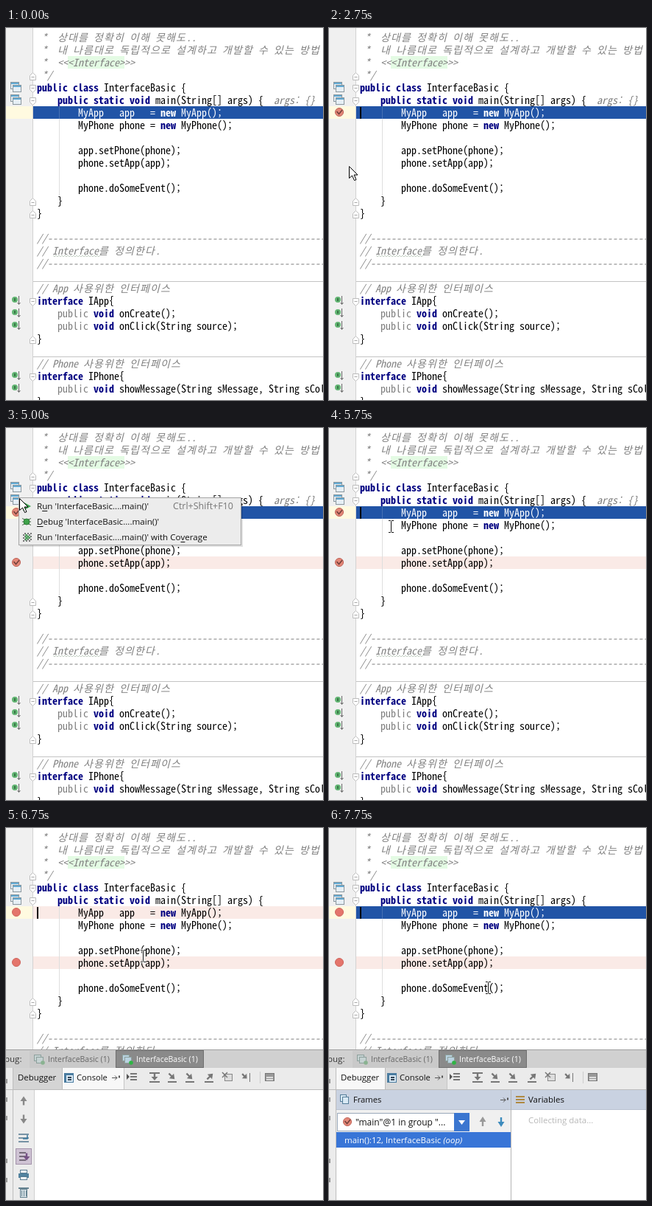
These frames come from a looping animation (431 px wide and 504 px high, 8000 ms). An HTML page with a canvas:

```html
<!DOCTYPE html>
<html lang="ko">
<head>
<meta charset="utf-8">
<style>
  html, body { margin: 0; width: 100%; height: 100%; overflow: hidden; background: #fff; }
  canvas { display: block; }
</style>
</head>
<body>
<canvas id="stage" width="431" height="504"></canvas>
<script>
const ctx = document.getElementById('stage').getContext('2d');
const LOOP = 8000, STEP = 250, ROW = 17, LEFT = 42, COLUMN = 7;
const MONO = '"Noto Sans Mono CJK KR", "Noto Sans Mono", "Noto Sans CJK KR", monospace';
const UI = '"Open Sans", "Noto Sans", sans-serif';
const BLUE = '#2154a6', PINK = '#faeae6', NAVY = '#000080', GRAY = '#808080';

ctx.font = `14px ${MONO}`;
const codeSize = 14 * COLUMN / ctx.measureText('a').width;

const rule = '//' + '-'.repeat(70);
const code = [
  ' *  상대를 정확히 이해 못해도..',
  ' *  내 나름대로 독립적으로 설계하고 개발할 수 있는 방법',
  ' *  <<<Interface>>>',
  ' */',
  'public class InterfaceBasic {',
  '    public static void main(String[] args) {',
  '        MyApp   app   = new MyApp();',
  '        MyPhone phone = new MyPhone();',
  '',
  '        app.setPhone(phone);',
  '        phone.setApp(app);',
  '',
  '        phone.doSomeEvent();',
  '    }',
  '}',
  '',
  rule,
  '// Interface를 정의한다.',
  rule,
  '',
  '// App 사용위한 인터페이스',
  'interface IApp{',
  '    public void onCreate();',
  '    public void onClick(String source);',
  '}',
  '',
  '// Phone 사용위한 인터페이스',
  'interface IPhone{',
  '    public void showMessage(String sMessage, String sColor);',
  '}'
];
const KEYWORDS = /\b(public|class|static|void|new|interface)\b/;
const HANGUL = /([가-힣])/;
const FIRST_INTERFACE = 21, CURRENT = 6, SECOND_STOP = 10;
const rowY = i => 13 + i * ROW;

// Pointer keys: time, x, y, shape.
const pointerKeys = [
  [250, 105, 130, 'beam'], [1250, 42, 118, 'beam'],
  [1500, 37, 114, 'arrow'], [1750, 15, 113, 'arrow'], [2000, 15, 113, 'arrow'],
  [2500, 26, 183, 'arrow'], [2750, 27, 187, 'arrow'], [3000, 15, 183, 'arrow'],
  [3250, 15, 183, 'arrow'], [3750, 26, 144, 'arrow'], [4250, 13, 100, 'arrow'],
  [4500, 18, 95, 'arrow'], [5000, 18, 95, 'arrow'], [5500, 62, 127, 'arrow'],
  [5750, 84, 133, 'beam'], [6000, 97, 136, 'beam'], [6250, 97, 136, 'beam'],
  [7000, 230, 192, 'beam'], [7500, 238, 195, 'beam'], [7750, 216, 216, 'beam']
];

function box(x, y, w, h, fill, stroke) {
  if (fill) { ctx.fillStyle = fill; ctx.fillRect(x, y, w, h); }
  if (stroke) { ctx.strokeStyle = stroke; ctx.lineWidth = 1; ctx.strokeRect(x + .5, y + .5, w - 1, h - 1); }
}
function shape(points, fill, stroke, width = 1) {
  ctx.beginPath();
  points.forEach(([x, y]) => ctx.lineTo(x, y));
  if (fill) { ctx.closePath(); ctx.fillStyle = fill; ctx.fill(); }
  if (stroke) { ctx.strokeStyle = stroke; ctx.lineWidth = width; ctx.stroke(); }
}
function disc(x, y, r, fill, stroke) {
  ctx.beginPath();
  ctx.arc(x, y, r, 0, 7);
  ctx.fillStyle = fill; ctx.fill();
  if (stroke) { ctx.strokeStyle = stroke; ctx.lineWidth = 1; ctx.stroke(); }
}
function text(str, x, y, color, font = `11.5px ${UI}`) {
  ctx.font = font;
  ctx.fillStyle = color;
  ctx.fillText(str, x, y);
  return x + ctx.measureText(str).width;
}
function at(x, y, draw) {
  ctx.save(); ctx.translate(x, y); draw(); ctx.restore();
}
function wave(x, y, w) {
  const points = [];
  for (let i = 0; i <= w; i += 2) points.push([x + i, y + (i % 4 ? 1 : -1)]);
  shape(points, null, '#c4cfc4');
}

// Hangul takes two columns of the code grid.
function drawComment(line, y) {
  let column = 0;
  for (const part of line.split(HANGUL)) {
    text(part, LEFT + column * COLUMN, y, GRAY, `italic ${codeSize}px ${MONO}`);
    column += HANGUL.test(part) ? 2 : part.length;
  }
}
function drawCodeLine(line, row, white) {
  const y = rowY(row) + 5;
  if (/^( \*|\/\/)/.test(line)) return drawComment(line, y);
  let column = 0;
  for (const part of line.split(KEYWORDS)) {
    const muted = part === 'public' && row > FIRST_INTERFACE;
    const keyword = KEYWORDS.test(part) && !muted;
    const color = white ? '#fff' : muted ? GRAY : keyword ? NAVY : '#000';
    text(part, LEFT + column * COLUMN, y, color, `${keyword ? 'bold ' : ''}${codeSize}px ${MONO}`);
    column += part.length;
  }
}

function foldMark(y, up) {
  const d = up ? -1 : 1;
  at(36.5, y + .5, () => {
    shape([[-4, -5 * d], [4, -5 * d], [4, 1 * d], [0, 5 * d], [-4, 1 * d], [-4, -5 * d]], '#fff', '#bcbcbc');
    shape([[-2, -d], [2, -d]], null, '#a8a8a8');
  });
}
function classMark(y) {
  for (const [dx, dy] of [[0, 0], [3, 4]]) {
    box(6 + dx, y + dy, 12, 10, '#e6eff5', '#8c989f');
    box(7 + dx, y + 1 + dy, 10, 2, '#62a9d2');
  }
}
function implementedMark(y) {
  disc(12, y - 2, 4, '#62b573');
  shape([[12, y - 4], [12, y]], null, '#1f4a28', 1.2);
  shape([[17.5, y - 7], [17.5, y + 4]], null, '#666');
  shape([[15.5, y + 2], [17.5, y + 4.5], [19.5, y + 2]], null, '#666');
}
function breakpoint(y, checked) {
  disc(14, y, 5.5, checked ? '#e48878' : '#e4756c', checked ? '#bd5f55' : '#cf645c');
  if (checked) shape([[10.5, y - 1], [13.5, y + 2.5], [18, y - 3]], null, '#703f3a', 1.5);
}

function drawEditor(t) {
  const launched = t >= 6500, stopped = !launched || t >= 7750;
  const firstStop = t >= 2000, secondStop = t >= 3000;
  const top = row => rowY(row) - 9;

  box(0, 0, 431, 504, '#fff');
  box(0, 0, 36, 504, '#f0f0f0');
  box(36, 0, 1, 504, '#d2d2d2');
  box(84, top(2), 77, ROW, '#e4fbe4');
  if (secondStop) box(37, top(SECOND_STOP), 394, ROW, PINK);
  box(0, top(CURRENT), 36, ROW, '#fffae0');
  box(37, top(CURRENT), 394, ROW, stopped ? BLUE : PINK);
  box(72, top(CURRENT), 1, 121, '#dedede');
  if (stopped) box(72, top(CURRENT), 1, ROW, '#4670b4');
  for (const y of [343, 445]) box(37, y, 394, 1, '#c4c4c4');

  code.forEach((line, row) => drawCodeLine(line, row, stopped && row === CURRENT));
  if (!launched) text('args: {}', 364, rowY(5) + 5, '#7c7c7c', `italic ${codeSize}px ${MONO}`);
  wave(64, 309, 64);

  [4, 5, 21, 27].forEach(row => foldMark(rowY(row) + 1, false));
  [3, 13, 14, 24].forEach(row => foldMark(rowY(row) + 1, true));
  [73, 90].forEach(classMark);
  [21, 22, 23, 27, 28].forEach(row => implementedMark(rowY(row)));
  if (firstStop) {
    breakpoint(rowY(CURRENT) - 1, !launched);
    box(42, top(CURRENT) + 1, 2, 16, '#000');
  }
  if (secondStop) breakpoint(rowY(SECOND_STOP) - 1, !launched);
}

function bug(x, y) {
  for (const d of [-3, 0, 3]) shape([[x - 6, y + d * 1.5], [x, y + d * .6], [x + 6, y + d * 1.5]], null, '#4b6b4b');
  disc(x, y, 4, '#3ea34a', '#2d7a37');
}
function drawMenu(hover) {
  box(19, 97, 303, 64, 'rgba(0,0,0,.12)');
  box(17, 94, 303, 65, '#ececec', '#a6a6a6');
  if (hover) box(18, 117, 301, 21, BLUE);
  shape([[23, 100], [34, 106], [23, 112]], '#3fa451');
  bug(28, 127);
  for (let i = 0; i < 36; i++) {
    const dx = i % 6 * 2, dy = Math.floor(i / 6) * 2;
    if ((i + dy / 2) % 2) box(23 + dx, 142 + dy, 2, 2, '#777');
  }
  shape([[26, 143], [34, 148], [26, 153]], 'rgba(63,164,81,.7)');

  const items = [
    ['R', 'u', "n 'InterfaceBasic....main()'"],
    ['', 'D', "ebug 'InterfaceBasic....main()'"],
    ["Run 'InterfaceBasic....main()' with Co", 'v', 'erage']
  ];
  const font = `11.6px ${UI}`;
  items.forEach(([before, mnemonic, after], i) => {
    const y = 110 + i * 21, color = hover && i === 1 ? '#fff' : '#111';
    const start = text(before, 42, y, color, font);
    const end = text(mnemonic, start, y, color, font);
    box(start, y + 2, end - start, 1, color);
    text(after, end, y, color, font);
  });
  text('Ctrl+Shift+F10', 227, 110, '#777', `12.5px ${UI}`);
}

function arrow(x, y, angle, color, length = 10) {
  at(x, y, () => {
    ctx.rotate(angle);
    const h = length / 2;
    shape([[-1.2, -h], [1.2, -h], [1.2, 0], [4.5, 0], [0, h + 1], [-4.5, 0], [-1.2, 0]], color);
  });
}
function pinMark(x, y) {
  shape([[x - 5, y], [x + 2, y]], null, '#555');
  shape([[x - 1, y - 3], [x + 2, y], [x - 1, y + 3]], null, '#555');
  box(x + 4, y - 3, 2, 3, '#555');
}
function lines(x, y, w, color, count = 3, gap = 4) {
  for (let i = 0; i < count; i++) box(x, y + i * gap, w, 2, color);
}
function consoleMark(x, y) {
  box(x, y, 13, 13, '#d9e9f4', '#4a7ca0');
  box(x, y, 13, 3, '#4a7ca0');
  box(x, y, 3, 13, '#4a7ca0');
  lines(x + 5, y + 5, 5, '#345', 2, 3);
}

function drawToolbar(consoleOpen) {
  box(0, 300, 431, 204, '#ececec');
  box(0, 300, 431, 25, '#d0d0d0');
  box(0, 300, 431, 1, '#a0a0a0');
  text('bug:', -2, 317, '#333');
  box(32, 302, 117, 23, '#c9c9c9');
  box(149, 301, 120, 24, '#8a8a8a', '#6f6f6f');
  for (const [x, color] of [[57, '#666'], [177, '#fff']]) {
    const active = x > 100;
    box(x - 19, 307, 10, 9, active ? '#b9d2e0' : '#c5d2d2', '#8da09c');
    box(x - 16, 310, 10, 9, active ? '#b9d2e0' : '#c5d2d2', '#8da09c');
    disc(x - 7, 318, 2.8, active ? '#2fb544' : '#8ab391');
    text('InterfaceBasic (1)', x, 317, color, `10.5px ${UI}`);
  }
  box(0, 325, 431, 29, '#ebebeb');
  box(10, 325, 66, 29, consoleOpen ? '#d4d4d4' : '#f8f8f8');
  box(76, 325, 84, 29, consoleOpen ? '#f8f8f8' : '#d8d8d8');
  box(76, 325, 1, 29, '#bbb');
  box(160, 325, 1, 29, '#c5c5c5');
  text('Debugger', 16, 342, '#111', `11.4px ${UI}`);
  consoleMark(79, 332);
  text('Console', 96, 342, '#111', `11.2px ${UI}`);
  pinMark(149, 338.5);

  lines(169, 332, 9, '#777');
  shape([[164, 333], [168, 337], [164, 341]], '#555');
  box(195, 331, 14, 2, '#777'); arrow(202, 337, 0, '#777', 8); box(195, 343, 14, 2, '#777');
  for (const x of [225, 249]) { arrow(x, 336, -.8, '#777'); box(x - 5, 343, 12, 2, '#777'); }
  arrow(277, 337, Math.PI + .8, '#777');
  box(270, 343, 12, 2, '#777');
  box(297, 333, 11, 10, '#ddd', '#888');
  shape([[294, 331], [301, 338]], null, '#777', 1.5);
  shape([[301, 331], [294, 338]], null, '#777', 1.5);
  arrow(324, 336, -.8, '#777', 8); shape([[331.5, 332], [331.5, 344]], null, '#777');
  box(345, 330, 1, 16, '#ccc');
  box(352, 332, 13, 11, '#999', '#777');
  lines(354, 337, 9, '#ddd', 2, 3);

  box(9, 325, 1, 179, '#bdbdbd');
  box(0, 354, 431, 1, '#bcbcbc');
  for (const y of [340, 365, 390, 448, 474]) box(0, y, 2, 6, '#999');
}

function drawConsole(t) {
  box(39, 355, 392, 149, '#fff');
  box(38, 355, 1, 149, '#d0d0d0');
  arrow(24, 370, Math.PI, '#888', 11);
  arrow(24, 394, 0, '#888', 11);
  lines(17, 414, 14, '#7793a5', 3, 5);
  shape([[29, 416], [29, 421], [23, 421]], null, '#35759c', 1.5);
  box(13, 434, 22, 22, '#cfc3d4', '#a493ab');
  lines(18, 439, 9, '#756b7a', 3, 5);
  arrow(28, 445, 0, '#765286', 9);
  box(19, 463, 10, 5, '#fff', '#587b91');
  box(17, 468, 14, 6, '#52839f');
  box(19, 472, 10, 5, '#fff', '#587b91');
  box(19, 489, 10, 12, '#d7e2e7', '#668391');
  box(17, 487, 14, 2, '#668391');
  for (const x of [21, 24, 27]) box(x, 491, 1, 8, '#668391');
  if (t < 7000) return;
  box(53, 358, 337, 18, '#e8f8e6');
  text('"C:₩Program Files₩Java₩jdk1.8.0_65₩bin₩java" ...', 54, 371, '#14532a',
    'bold 11.667px "Noto Sans Mono", "Liberation Mono", monospace');
  if (t >= 7500) {
    text("Connected to the target VM, address: '127.0.0.1:49404', transport: 'socket'", 54, 389, NAVY,
      `${codeSize * 6 / 7}px ${MONO}`);
  }
}

function drawFrames() {
  box(10, 355, 421, 149, '#fff');
  box(10, 355, 421, 26, '#c9d2e1');
  box(10, 381, 421, 1, '#b9c2d0');
  box(10, 382, 237, 30, '#f0f0f0');
  box(247, 355, 1, 149, '#b5b5b5');
  box(15, 361, 9, 10, '#d9e9f4', '#557d99');
  box(18, 364, 9, 10, '#d9e9f4', '#557d99');
  text('Frames', 33, 372, '#111', `11.2px ${UI}`);
  pinMark(238, 368.5);
  lines(254, 363, 12, '#b08a42');
  text('Variables', 271, 372, '#111', `11.5px ${UI}`);

  box(11, 386, 180, 25, '#fff', '#9aa9bb');
  box(170, 386, 21, 25, '#3b76d0');
  shape([[176, 396], [185, 396], [180.5, 402]], '#fff');
  at(11, 398, () => breakpoint(0, true));
  text('"main"@1 in group "...', 36, 403, '#111', `12px ${UI}`);
  arrow(209, 398, Math.PI, '#999', 12);
  arrow(234, 398, 0, '#3c8bbd', 12);

  box(10, 412, 237, 21, '#3875d7');
  const end = text('main():12, InterfaceBasic ', 21, 427, '#fff', `11.5px ${UI}`);
  text('(oop)', end, 427, '#fff', `italic 11.5px ${UI}`);
  text('Collecting data...', 271, 400, '#b8b8b8', `11.5px ${UI}`);
}

function drawPointer(t) {
  if (t < pointerKeys[0][0]) return;
  const i = pointerKeys.findLastIndex(key => key[0] <= t);
  const from = pointerKeys[i], to = pointerKeys[i + 1] || from;
  const k = to === from ? 0 : (t - from[0]) / (to[0] - from[0]);
  const x = Math.round(from[1] + (to[1] - from[1]) * k);
  const y = Math.round(from[2] + (to[2] - from[2]) * k);
  at(x + .5, y + .5, () => {
    if (from[3] === 'arrow') {
      ctx.lineJoin = 'round';
      shape([[0, 0], [0, 16], [4, 12.5], [7, 19], [9.5, 18], [6.5, 11.5], [11.5, 11.5], [0, 0]], '#fff', '#000');
      return;
    }
    for (const [color, width] of [['#fff', 3], ['#111', 1]]) {
      shape([[0, -7], [0, 7]], null, color, width);
      for (const end of [-8, 8]) shape([[-3.5, end], [-1, end], [0, end * .9], [1, end], [3.5, end]], null, color, width);
    }
  });
}

function draw(t) {
  drawEditor(t);
  if (t >= 4750 && t < 5750) drawMenu(t >= 5500);
  if (t >= 6750) {
    const consoleOpen = t < 7750;
    drawToolbar(consoleOpen);
    if (consoleOpen) drawConsole(t); else drawFrames();
  }
  drawPointer(t);
}

const start = performance.now();
function tick() {
  const t = (performance.now() - start) % LOOP;
  draw(Math.floor(t / STEP) * STEP);
  requestAnimationFrame(tick);
}
tick();
</script>
</body>
</html>
```
